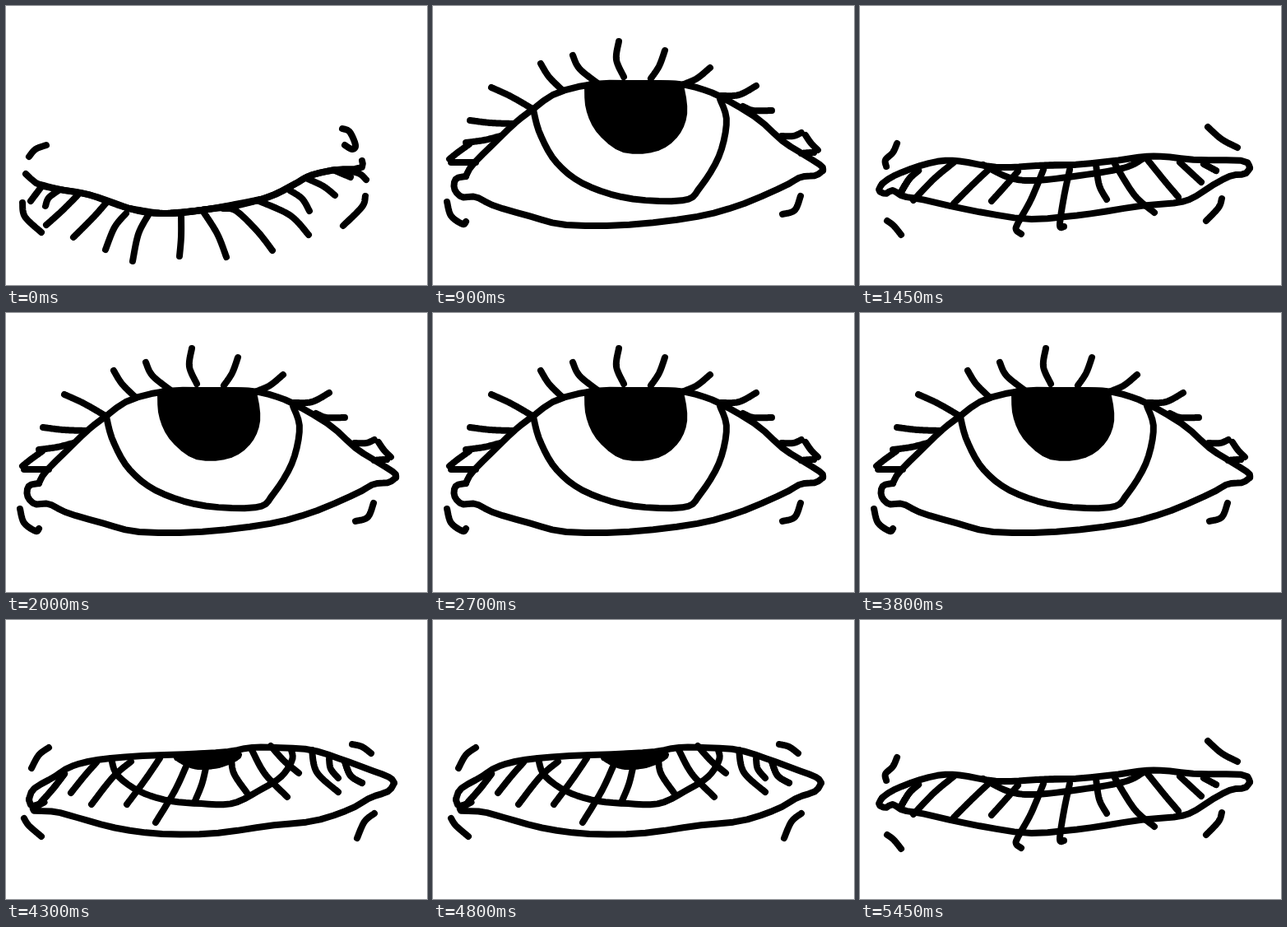
An HTML page with a canvas that plays this animation: 512 px wide and 339 px high, repeating every 5.5 s.

```html
<!DOCTYPE html>
<html lang="en">
<head>
<meta charset="utf-8">
<title>Blinking eye</title>
<style>
  html, body { margin: 0; width: 100%; height: 100%; overflow: hidden; background: #fff; }
  canvas { display: block; width: 100vw; height: 100vh; }
</style>
</head>
<body>
<canvas id="stage" width="512" height="339"></canvas>
<script>
const ctx = document.getElementById('stage').getContext('2d');
const SAMPLES = 40;
const LASHES = 14;

// Smooth curve through "x,y x,y ..." resampled to a fixed number of points.
function curve(text) {
  const pts = text.split(' ').map(p => p.split(',').map(Number));
  const last = pts.length - 1;
  const at = i => pts[Math.max(0, Math.min(last, i))];
  return Array.from({ length: SAMPLES + 1 }, (_, n) => {
    const u = n / SAMPLES * last;
    const i = Math.min(last - 1, Math.floor(u));
    const t = u - i;
    return [0, 1].map(k => {
      const [a, b, c, d] = [at(i - 1)[k], at(i)[k], at(i + 1)[k], at(i + 2)[k]];
      return b + t / 2 * (c - a + t * (2 * a - 5 * b + 4 * c - d + t * (3 * (b - c) + d - a)));
    });
  });
}

// A pose is a list of curves: pupil, lids, iris, corner marks, lashes.
// Poses with fewer lashes repeat their outermost ones, offset by shift.
function pose({ pupil, upper, lower, iris, marks, lashes, shift = 0 }) {
  const fitted = Array.from({ length: LASHES }, (_, i) =>
    lashes[Math.max(0, Math.min(lashes.length - 1, i - shift))]);
  return [pupil, upper, lower, iris, ...marks, ...fitted].map(curve);
}

const closed = pose({
  pupil: '195,252 220,250 245,247',
  upper: '24,204 40,217 66,223 100,229 125,237 150,246 172,251 195,252 220,250 245,247 278,243 310,235 330,228 350,217 370,206 400,199 431,197 433,188',
  lower: '400,199 370,206 350,217 310,235 245,247 195,252 150,246 100,229 66,223 42,217',
  iris: '150,246 195,252 245,247 310,235',
  marks: ['28,183 36,174 49,169', '20,239 23,256 43,275',
    '409,149 418,153 425,169 421,174 412,169', '437,231 433,244 410,267'],
  lashes: ['42,221 30,237', '64,224 52,233 48,243', '87,230 68,249 49,266',
    '122,239 106,257 82,281', '146,252 132,269 121,296', '173,254 161,277 154,310',
    '213,252 213,280 211,304', '240,250 257,277 268,305', '264,246 280,249 306,274 324,297',
    '305,236 345,254 368,278', '345,224 360,234 369,249', '367,210 386,219 400,230',
    '400,200 419,208', '404,199 428,203 438,211']
});

const slit = pose({
  shift: 2,
  pupil: '215,194 240,193 260,193',
  upper: '27,216 40,207 70,195 100,188 125,189 158,195 185,196 215,194 260,193 310,188 345,183 370,183 410,187 465,188 474,197',
  lower: '474,197 468,204 452,206 430,217 405,233 385,239 340,243 290,251 250,256 205,259 155,252 110,243 75,235 52,231 40,224 31,228 23,224 27,216',
  iris: '150,193 180,208 210,212 260,207 320,197 345,185',
  marks: ['45,167 40,178 31,187 32,195', '33,261 41,267 50,278',
    '423,147 440,162 459,172', '440,234 436,245 421,261'],
  lashes: ['71,200 60,210 50,226', '114,190 90,210 65,236', '155,200 135,219 114,240',
    '192,201 179,216 160,237', '223,199 208,235 192,264 190,272 196,277',
    '255,199 248,232 243,266 248,268', '287,193 291,218 300,235', '310,192 334,230 358,251',
    '349,186 370,212 387,232', '389,190 415,214', '418,192 433,200']
});

const half = pose({
  shift: 1,
  pupil: '208,167 218,173 235,178 262,175 282,163 230,163 208,167',
  upper: '28,218 34,205 58,191 77,179 105,171 150,166 220,163 270,160 298,155 330,155 372,158 410,170 440,181 466,191 472,198',
  lower: '472,198 465,208 443,216 418,230 375,244 320,250 255,259 190,260 135,253 90,241 60,233 32,231 47,221 32,226 28,218',
  iris: '128,168 135,188 160,207 195,219 235,223 275,223 310,206 335,190 348,170 347,158',
  marks: ['52,155 40,164 31,180', '22,241 28,250 43,263',
    '421,151 433,154 444,162', '448,235 436,245 427,265'],
  lashes: ['71,187 58,204 43,221', '110,173 95,190 79,210', '152,172 130,191 104,224',
    '187,168 170,193 147,224', '219,178 205,208 182,246', '243,180 238,200 229,222',
    '274,165 277,186 293,210', '299,158 315,187 342,215', '322,153 338,171 356,186',
    '372,158 378,185 404,209', '393,169 395,181 404,192', '412,172 419,189 433,198']
});

const open = pose({
  pupil: '188,98 190,125 203,152 232,174 270,173 294,157 305,132 302,102 295,95 245,95 195,95 188,98',
  upper: '40,207 48,193 75,166 100,142 122,125 150,106 195,95 250,94 300,95 330,102 355,113 395,137 425,164 450,180 472,194 474,200',
  lower: '474,200 465,206 447,208 425,220 370,243 315,257 235,266 162,266 120,256 75,243 52,232 35,232 26,222 28,210 40,207',
  iris: '122,126 130,155 150,190 185,217 240,234 305,236 325,220 348,182 357,140 349,113',
  marks: ['44,168 30,178 20,186', '17,238 22,255 36,265 40,262',
    '453,157 460,167 468,175', '447,231 440,248 425,253'],
  lashes: ['52,190 22,190', '82,158 62,163 40,166', '97,143 70,142 45,139',
    '121,125 95,110 71,99', '157,102 141,86 131,70', '199,93 178,76 170,60',
    '232,86 223,65 226,43', '265,88 275,73 282,54', '305,95 321,88 337,75',
    '350,109 372,108 393,97', '377,122 390,127 412,127', '424,158 438,158 448,154',
    '448,179 463,178']
});

const wide = open.map(line => line.map(([x, y]) =>
  [5 + (x - 17) * 1.068, 18 + (y - 43) * 1.153]));

const mix = (a, b, t) => a.map((line, i) => line.map((p, j) =>
  p.map((v, k) => v + (b[i][j][k] - v) * t)));

const poses = [
  closed, mix(closed, slit, 0.2), mix(closed, slit, 0.42), mix(closed, slit, 0.62),
  slit, half, mix(half, open, 0.5), open,
  mix(open, wide, 0.3), mix(open, wide, 0.55), wide
];

const steps = [0, 1, 2, 3, 4, 5, 6, 7, 8, 9, 10, 8, 7, 6, 5, 4];
const holds = { 0: 100, 1: 100, 2: 100, 9: 100, 10: 150 };
const holdOf = step => holds[step] || 50;
const BLINK = steps.reduce((sum, step) => sum + holdOf(step), 0);

function poseAt(time) {
  let rest = time % BLINK;
  return poses[steps.find(step => (rest -= holdOf(step)) < 0)];
}

function draw() {
  ctx.fillStyle = '#fff';
  ctx.fillRect(0, 0, 512, 339);
  ctx.fillStyle = ctx.strokeStyle = '#000';
  ctx.lineWidth = 8;
  ctx.lineCap = ctx.lineJoin = 'round';
  poseAt(performance.now()).forEach((line, i) => {
    ctx.beginPath();
    line.forEach(([x, y]) => ctx.lineTo(x, y));
    if (i === 0) ctx.fill();
    ctx.stroke();
  });
  requestAnimationFrame(draw);
}
draw();
</script>
</body>
</html>
```
